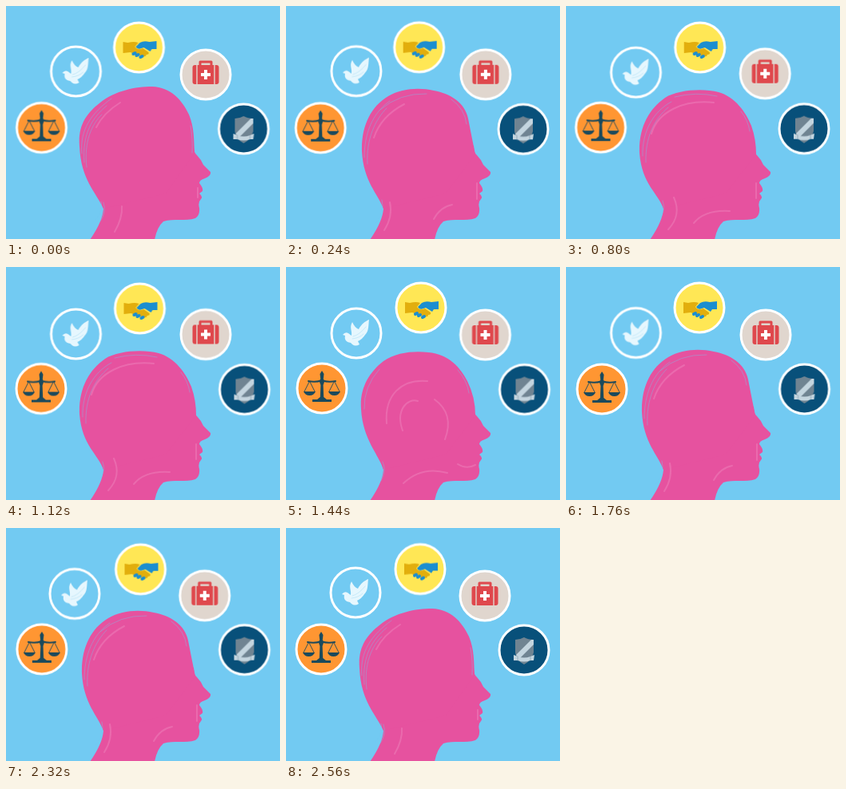
Recreate the animation shown at these times as an HTML page without scripts. Size 343 by 292 pixels, loop 2640 ms.

```html
<!DOCTYPE html>
<html lang="en">
<head>
<meta charset="utf-8">
<title>Head with five ideas</title>
<style>
  html, body { margin: 0; height: 100%; overflow: hidden; background: #72caf2; }
  svg { display: block; width: 100vw; height: 100vh; }
  .poses, .icon, .icon > g { animation: 2640ms infinite; }
  .poses { animation-name: pose; animation-timing-function: step-end; fill: #e6529f; }
  .icon { animation-name: wander; }
  .icon > g { animation-name: jiggle; animation-timing-function: step-end; }
  .ring { stroke: #fff; stroke-width: 3; }
  .line { fill: none; stroke-linecap: round; stroke-linejoin: round; }
  .dry { stroke: #72caf2; stroke-width: 1; opacity: .38; }
  .pale { stroke: #f08fc2; stroke-width: 2; opacity: .4; }

  /* Head drawings sit side by side, 400 units apart. */
  @keyframes pose {
    0%, 18.18%, 36.36%, 57.57%, 75.75%, 96.96% { transform: none; }
    3.03%, 30.3%, 42.42%, 69.69%, 81.81% { transform: translateX(-400px); }
    12.12%, 33.33%, 51.51%, 72.72%, 90.9% { transform: translateX(-800px); }
    9.09%, 24.24%, 48.48%, 63.63%, 87.87% { transform: translateX(-1200px); }
  }
  @keyframes wander {
    0% { transform: translate(var(--a)); animation-timing-function: steps(6); }
    18.18% { transform: translate(var(--b)); animation-timing-function: steps(8); }
    42.42% { transform: translate(var(--c)); animation-timing-function: steps(4); }
    54.54% { transform: translate(var(--d)); animation-timing-function: steps(4); }
    66.66% { transform: translate(var(--e)); animation-timing-function: steps(4); }
    78.78% { transform: translate(var(--f)); animation-timing-function: steps(6); }
    96.96%, 100% { transform: translate(var(--g)); }
  }
  @keyframes jiggle {
    0%, 6.06%, 12.12%, 18.18%, 24.24%, 30.3%, 36.36%, 42.42%, 48.48%, 54.54%, 60.6%,
    66.66%, 72.72%, 78.78%, 84.84%, 90.9%, 96.96% { transform: none; }
    3.03%, 15.15%, 27.27%, 39.39%, 51.51%, 63.63%, 75.75%, 87.87% { transform: translate(var(--j)); }
    9.09%, 21.21%, 33.33%, 45.45%, 57.57%, 69.69%, 81.81%, 93.93% { transform: translate(var(--k)); }
  }

  .scales { --a: 44.5px,152.5px; --b: 43px,152px; --c: 44px,152.5px; --d: 45px,152px;
            --e: 45px,153px; --f: 44.5px,152.5px; --g: 44px,152px; --j: .6px,-.4px; --k: -.5px,.5px; }
  .dove   { --a: 87.5px,82px; --b: 87.5px,82.5px; --c: 87.5px,84px; --d: 88px,83px;
            --e: 87.5px,82.5px; --f: 86px,83px; --g: 87px,81px; --j: -.6px,.4px; --k: .4px,-.6px; }
  .hands  { --a: 166.5px,52px; --b: 168px,52px; --c: 167.5px,52px; --d: 169px,51px;
            --e: 167px,51px; --f: 168px,51px; --g: 168px,51.5px; --j: .5px,.5px; --k: -.6px,-.3px; }
  .kit    { --a: 250px,86px; --b: 248.5px,85px; --c: 250px,84.5px; --d: 249.5px,85px;
            --e: 250px,85px; --f: 249.5px,85.5px; --g: 249px,85px; --j: -.5px,-.5px; --k: .6px,.3px; }
  .shield { --a: 297.5px,154px; --b: 297.5px,154px; --c: 298.5px,153.5px; --d: 298.5px,153.5px;
            --e: 298.5px,153px; --f: 298px,153.5px; --g: 298px,153px; --j: .5px,-.6px; --k: -.5px,.3px; }
</style>
</head>
<body>
<svg viewBox="0 0 343 292" preserveAspectRatio="none">
  <rect width="343" height="292" fill="#72caf2"/>

  <!-- neck and face -->
  <path fill="#e6529f" d="M105 293Q121 270 122 254Q120 245 113 235L125 175H235Q235 184 239 187Q244 192 247 199L256 208Q257 213 249 216Q242 218 242 222Q247 228 246 232L242 235Q247 239 244 242Q240 246 242 253Q243 262 237 266C225 270 210 266 197 270Q189 277 186 293Z"/>

  <g class="poses">
    <g>
      <path d="M122 254C112 232 94 218 92 176C90 150 100 135 118 121C137 106 162 101 183 101C206 102 220 117 229 136C236 153 235 168 236 184L200 235Z"/>
      <path class="line dry" d="M95 185C92 155 107 134 132 116M98 196C95 160 108 140 126 125M101 202C97 170 108 147 120 136M112 268Q122 257 119 245M118 270Q126 258 122 246M231 150Q234 166 233 184"/>
      <path class="line pale" d="M113 152Q122 134 143 121M136 283Q146 266 145 251M240 228V240"/>
    </g>
    <g transform="translate(400)">
      <path d="M122 254C116 235 95 224 92 184C91 152 104 129 124 115C140 105 171 103 191 108C212 114 225 133 232 150Q238 167 238 186L200 235Z"/>
      <path class="line dry" d="M96 188C95 158 109 132 132 120M100 196C99 165 110 142 128 127M136 114Q163 107 189 113M219 132Q228 143 230 157M118 266Q125 255 121 244"/>
      <path class="line pale" d="M107 160C115 132 148 117 185 121M128 280Q145 262 135 240M160 272Q174 255 205 257M238 222V241"/>
    </g>
    <g transform="translate(800)">
      <path d="M122 254C116 235 96 216 94 178C92 152 104 132 122 118C138 107 160 105 178 107C204 109 219 127 227 143Q237 163 237 186L200 235Z"/>
      <path class="line dry" d="M98 178Q97 150 117 128M119 268Q126 254 121 244M215 129Q227 143 229 158"/>
      <path class="line pale" d="M126 196C123 160 145 140 177 143M146 205C137 180 151 164 165 168M186 166Q211 184 199 216M147 271Q170 249 202 258M215 247Q226 254 237 248"/>
    </g>
    <g transform="translate(1200)">
      <path d="M122 254C115 235 97 220 95 182C94 151 106 126 128 113C145 103 167 102 185 106C206 110 224 121 228 141Q232 162 237 186L200 235Z"/>
      <path class="line dry" d="M98 190C98 160 108 134 130 119M102 198C100 167 112 142 126 128M118 130Q142 109 176 110M207 117Q224 129 226 148M113 272Q124 257 120 243"/>
      <path class="line pale" d="M110 165Q119 138 148 123M123 281Q134 264 130 246M185 267Q193 252 208 249M239 222V242"/>
    </g>
  </g>

  <g class="icon scales"><g>
    <circle class="ring" r="31" fill="#ff9632"/>
    <g fill="#1b4a5c">
      <path d="M0-22L2.5-18 1.8-12 3-8 1.6-4 2.2 11 6 14H12V17H-12V14H-6L-2.2 11-1.6-4-3-8-1.8-12-2.5-18Z"/>
      <path d="M-23 4H-8Q-10 9-15.500 9T-23 4ZM8 4H23Q21 9 15.500 9T8 4Z"/>
      <path class="line" stroke="#1b4a5c" stroke-width="2" d="M-17-9Q-8-7 0-10Q8-7 17-9"/>
      <path class="line" stroke="#1b4a5c" stroke-width=".9" d="M-22 4L-15.500-9-9 4M9 4L15.500-9 22 4"/>
    </g>
  </g></g>

  <g class="icon dove"><g>
    <circle class="ring" r="31" fill="#72caf2"/>
    <path fill="#e6f7fe" d="M-17 2Q-14-2-10 0L-6 3C-5-4-9-7-5-14Q-2-7 3-5C6-11 11-15 16-17C15-10 16-3 11 2Q8 7 2 10L4 14Q-1 17-5 14L-7 12C-13 11-15 8-14 3Z"/>
    <path class="line" stroke="#bfe6f8" stroke-width=".8" d="M-4 4Q4 2 12-8M-5 7Q4 6 9 1"/>
  </g></g>

  <g class="icon hands"><g>
    <circle class="ring" r="31" fill="#ffe755"/>
    <path fill="#1b8ed0" d="M22-8L13-7Q6-9 1-6L-4-1Q-2 3 3 1L6 0 14 5 16 2 22 2Z"/>
    <path fill="#e2ae0d" d="M-20-7L-14-6Q-6-8-1-6L-5-1Q-2 4 5 1L12 6Q13 9 9 9Q9 12 5 11L-5 8-11 6-20 7Z"/>
    <path class="line" stroke="#1b8ed0" stroke-width="4" d="M-7 8L-5 7M-3 10L-1 9M2 12L4 11"/>
  </g></g>

  <g class="icon kit"><g>
    <circle class="ring" r="31" fill="#e0d6ce"/>
    <path class="line" stroke="#df484d" stroke-width="3" d="M-7-11V-16H7V-11"/>
    <rect x="-16.500" y="-12" width="33" height="24" rx="3" fill="#df484d"/>
    <path stroke="#e0d6ce" stroke-width="1.400" d="M-11-12V12M11-12V12"/>
    <path stroke="#fff" stroke-width="4" d="M-6 0H6M0-6V6"/>
  </g></g>

  <g class="icon shield"><g>
    <circle class="ring" r="31" fill="#08507a"/>
    <path fill="#708492" d="M-11-13Q-5-13 0-16Q5-13 12-13V3Q10 13 0 18Q-10 13-11 3Z"/>
    <path fill="#c4d5df" d="M-10 6L9-13H12V-7L-6 11Z"/>
    <path fill="#c4d5df" d="M-13 6L-8 8Q0 11 8 8L13 6 12 13 8 13Q0 16-8 13L-13 13Z"/>
    <path class="line" stroke="#8fa4b2" stroke-width=".8" d="M-8 8V13M8 8V13"/>
  </g></g>
</svg>
</body>
</html>
```
